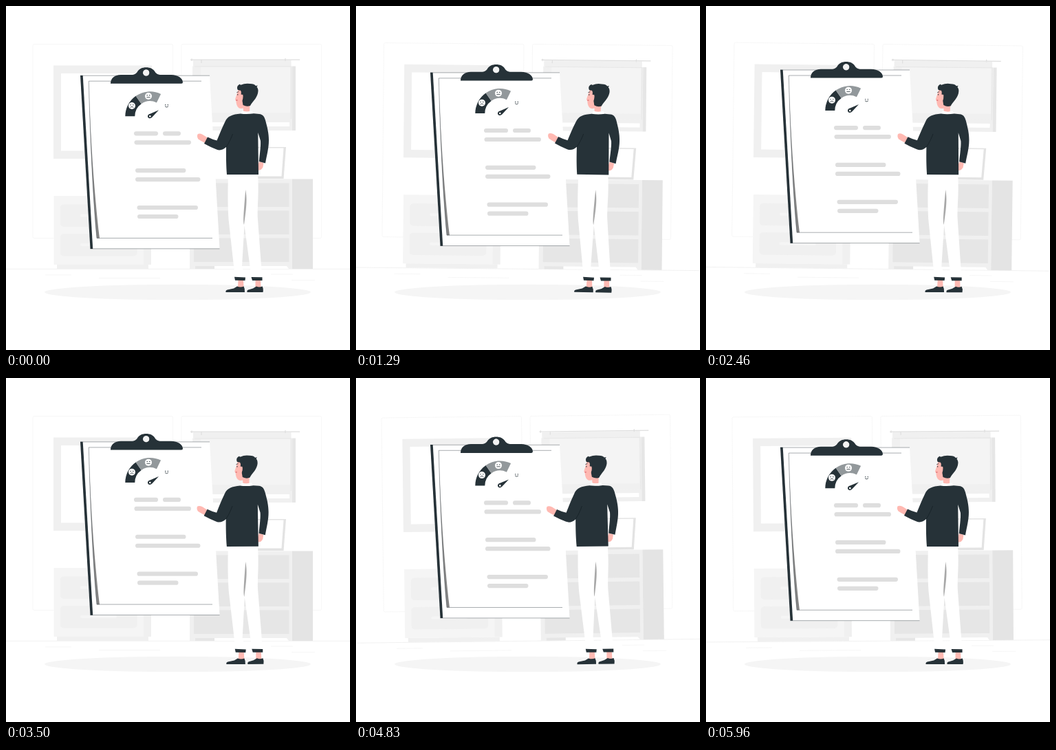
Recreate the animation shown at these times as an HTML page. Size 500 px wide and 500 px high, loop 6 s.

```html
<!DOCTYPE html>
<html lang="en">
<head>
<meta charset="utf-8">
<title>Feedback clipboard</title>
<style>
  html, body { margin: 0; width: 100%; height: 100%; overflow: hidden; background: #fff; }
  svg { display: block; width: 100%; height: 100%; }
  .ink { fill: #263238; }
  .skin { fill: #ffb9b2; }
  .white { fill: #fff; }
  .g1 { fill: #f5f5f5; }
  .g2 { fill: #f0f0f0; }
  .g3 { fill: #e6e6e6; }
  .hair { fill: none; stroke: #263238; stroke-width: .4; }
  .fine { fill: none; stroke: #263238; stroke-width: .8; stroke-linecap: round; }
</style>
</head>
<body>
<svg viewBox="0 0 500 500">
  <g id="room">
    <g fill="#fff" stroke="#f5f5f5" stroke-width=".8">
      <rect x="39" y="55.5" width="203.500" height="282" rx="2"/>
      <rect x="255" y="55.500" width="203.500" height="282" rx="2"/>
    </g>
    <path d="M0 382.300H500" stroke="#ebebeb" stroke-width=".7"/>
    <path d="M57 391H95M135 395.500H224M385 390H417M415 398.500H449" stroke="#f3f3f3" stroke-width=".7"/>

    <rect class="g2" x="69" y="86.500" width="143" height="135.500"/>
    <rect class="white" x="80" y="98" width="121" height="112.500"/>

    <rect class="g1" x="69.500" y="276" width="131" height="100"/>
    <rect class="g2" x="200" y="276" width="11" height="100"/>
    <rect class="g2" x="74" y="376" width="133" height="6"/>
    <g class="g2">
      <rect x="79" y="288.500" width="111.500" height="32.500" rx="5"/>
      <rect x="79" y="331" width="111.500" height="32.500" rx="5"/>
    </g>
    <g class="g1">
      <rect x="108" y="302.500" width="53" height="4" rx="2"/>
      <rect x="108" y="345" width="53" height="4" rx="2"/>
    </g>

    <rect class="g2" x="271" y="87.500" width="145" height="93.500"/>
    <rect class="g3" x="416" y="87.500" width="5" height="93.500"/>
    <rect class="white" x="283" y="169" width="129" height="6"/>
    <rect class="g2" x="272" y="79" width="142.500" height="85"/>
    <rect x="283" y="88" width="130" height="67" fill="#f4f4f4"/>
    <path d="M274 88H414.500V164" fill="none" stroke="#e8e8e8" stroke-width="1.200"/>
    <path d="M268 78.200H427M284 78v5M406 76v4M270 76.500v3.500" fill="none" stroke="#dedede" stroke-width="1.200"/>

    <rect class="g2" x="267" y="251.500" width="149" height="130.500"/>
    <rect x="416" y="251.500" width="30" height="130.500" fill="#e4e4e4"/>
    <g class="g3">
      <rect x="273" y="257.500" width="138.500" height="34.500"/>
      <rect x="273" y="297.500" width="138.500" height="34.500"/>
      <rect x="273" y="337.500" width="138.500" height="34.500"/>
      <rect x="275" y="378" width="28" height="4"/>
    </g>
    <path class="white" d="M303 382V378H408L411 382Z"/>
    <path d="M366 205H407L403.500 251H362Z" fill="#e3e3e3"/>
    <path class="white" d="M362 206.500H403.500L400.500 247.500H360Z"/>
  </g>

  <ellipse class="g1" cx="249.500" cy="416" rx="193.500" ry="11.300"/>

  <g id="board">
    <path class="white" d="M108 101.200H296L310.500 352.800H122.500Z"/>
    <path class="hair" d="M108 101.200H296M122.500 352.800H310.500"/>
    <path class="ink" d="M108 101H111.700L126.200 353H122.500Z"/>
    <path d="M120.300 109.200C122 180 128 270 136 337.500H132C126 275 122 180 120.300 109.200Z" fill="#858585"/>
    <path class="hair" d="M120.300 109.200H284M132 337.400H300"/>
    <path class="hair" d="M120.300 109.200C122 180 126 275 132 337.400"/>
    <path class="ink" fill-rule="evenodd" d="M152 112.800C152 105 158 100 167 100H182C187 100 189.500 98 191 95.500C193.500 91.300 198 89.300 203.700 89.300S214 91.300 216.500 95.500C218 98 220.500 100 226 100H240C250 100 257 105 257 111Q257 112.800 255 112.800ZM203.700 92.500a4.500 4.500 0 1 0 .01 0Z"/>
    <circle cx="203.700" cy="97" r="4.500" fill="#f3f3f3"/>
    <g id="gauge"></g>
    <g id="lines" stroke="#dedede" stroke-width="6.200" stroke-linecap="round"></g>
  </g>

  <g id="man">
    <path class="skin" d="M368 226L374.500 228L373.500 234Q371 239.500 366.500 238.500L366 232Z"/>
    <path class="skin" d="M293 191.500L286 187Q281 184.500 278.500 186.500Q277 190 279.500 193.500Q283 196 289 199Z"/>

    <path class="white" d="M323 244H366C368 275 365 290 366 310L371 378L372 394H357L354.500 378L346.500 319L343 378L347.500 394H332.500L331 378L323.500 310C322 285 322.500 265 323 244Z"/>
    <path d="M348.200 267C350.500 280 350 290 346 318C344.500 312 345.500 300 348.200 267Z" fill="#a8a8a8"/>

    <path class="skin" d="M337.500 398H345L345.500 409H337ZM362.500 398H370L370.500 409H362.500Z"/>
    <path class="ink" d="M332 393.700L348 394.500L347.500 399L333 398.700ZM356.500 394L372.500 394.200V399H358Z"/>
    <path class="ink" d="M319.500 416Q318.500 412.500 324 412L331 410.500L336 407.500Q341 409.500 345.500 407.500Q347.500 411 347 416ZM350.500 416Q349.500 412.500 354 412L359 410.500L364 407.500Q368 409.500 372.500 407.500Q374.500 411 373.500 416Z"/>

    <path class="skin" d="M344.500 142L354.500 143L354 153Q349 155 345 152.500Z"/>
    <path class="white" d="M343 152.500Q350 154.500 358 152.500L360 158H341Z"/>
    <path class="ink" d="M341 156.500Q350 157.800 360 156.300L368 157C373.500 157.500 375.500 161 377 166C380 177 382 185 382 195C382 207 379 217 377 228.500L367.800 226C369 213 370.500 204 370 196L366.300 184L367 245H321C320 232 319.800 220 320 205C316 209 311 210.500 306 208.500Q297 205 288 200L293 190.500Q300 194 306.500 195.500C310 187 314 177 318.500 168C322 160 329 157.500 341 156.500Z"/>
    <path d="M320 205C324 199 327 193 329.500 186" fill="none" stroke="#111b20" stroke-width=".6"/>

    <path class="skin" d="M338 120C336 126 335 130 333.200 135Q333 137 334.500 138C334.500 144 337 149 341.500 149Q347 149 350 144L350 121Z"/>
    <path class="ink" d="M336.500 121.500Q334.500 116 340 113.500Q340 115 342 114.500Q347 112 355 113Q361 113 363 116L365.800 115.500L364.500 117.500Q367.500 121 366 127C364 135 358 139 355 145Q350 147 344.500 144L343.500 138L344.500 129L341.500 128.500Q342.500 124 340.500 122.500Q338 123 336.500 121.500Z"/>
    <path class="skin" d="M344.500 131Q342 127.500 340.500 131Q340 136 342.500 138Q345 135 344.500 131Z"/>
    <path d="M334.400 137.200L336.500 136.800" stroke="#d6626a" stroke-width="1.200"/>
    <ellipse class="ink" cx="336.800" cy="128.800" rx=".6" ry="1"/>
    <path class="fine" d="M335.700 125.500L338 124.700"/>
  </g>
</svg>
<script>
const LOOP = 6000;
const el = id => document.getElementById(id);
const hub = { x: 209.3, y: 160.3 };

const polar = (r, deg) => {
  const a = deg * Math.PI / 180;
  return `${hub.x + r * Math.cos(a)} ${hub.y - r * Math.sin(a)}`;
};

const segment = (from, to, fill) =>
  `<path fill="${fill}" d="M${polar(36, from)}A36 36 0 0 1 ${polar(36, to)}` +
  `L${polar(22, to)}A22 22 0 0 0 ${polar(22, from)}Z"/>`;

// bend: how far the middle of the mouth sits below its corners
const face = (x, y, bend) =>
  `<g transform="translate(${x} ${y})"><circle class="white" r="5"/>
    <circle class="ink" cx="-1.8" cy="-1.2" r=".7"/><circle class="ink" cx="1.8" cy="-1.2" r=".7"/>
    <path class="fine" d="M-2.2 ${1.7 - bend / 2}Q0 ${1.7 + bend * 1.5} 2.2 ${1.7 - bend / 2}"/></g>`;

el('gauge').innerHTML =
  segment(180, 125, '#263238') + segment(125, 64, '#92989b') +
  face(183, 145, -1.2) + face(207, 131, 0) + face(233.5, 145, 1.2) +
  `<path class="ink" d="M222 151.300L212.500 161.500Q210.500 164 207.500 163Q205 161 206.500 158.500Q207.500 157 210 156.500Z"/>
   <circle class="white" cx="209.300" cy="160.300" r="1.300"/>`;

const bars = [
  [186, 221, 185.3], [228, 254, 185.3], [186.5, 269, 198.3], [188, 261.5, 239.1],
  [188, 282.5, 252.1], [190.5, 279, 293], [191, 250.5, 306]
];
el('lines').innerHTML = bars
  .map(([x1, x2, y]) => `<path d="M${x1 + 3.1} ${y}H${x2 - 3.1}"/>`).join('');

// Linear interpolation through [time, value] stops
const along = (stops, t) => {
  const i = Math.max(1, stops.findIndex(s => s[0] >= t));
  const [t0, v0] = stops[i - 1], [t1, v1] = stops[i];
  return v0 + (v1 - v0) * (t - t0) / (t1 - t0);
};

const lift = [[0, 0], [3000, -10], [LOOP, 0]];
const sway = [[0, 0], [1500, 1], [4500, -1], [LOOP, 0]];
const roomSway = [[0, 0], [500, 0], [1500, .67], [2500, .67], [4500, -.67], [5500, -.67], [LOOP, -.33]];

function draw(now) {
  const t = now % LOOP;
  el('board').setAttribute('transform', `translate(0 ${along(lift, t)})`);
  el('man').setAttribute('transform', `rotate(${along(sway, t)} 330 265)`);
  el('room').setAttribute('transform', `rotate(${along(roomSway, t)} 250 226)`);
}

let start;
function tick(now) {
  start ??= now;
  draw(now - start);
  requestAnimationFrame(tick);
}
draw(0);
requestAnimationFrame(tick);
</script>
</body>
</html>
```
